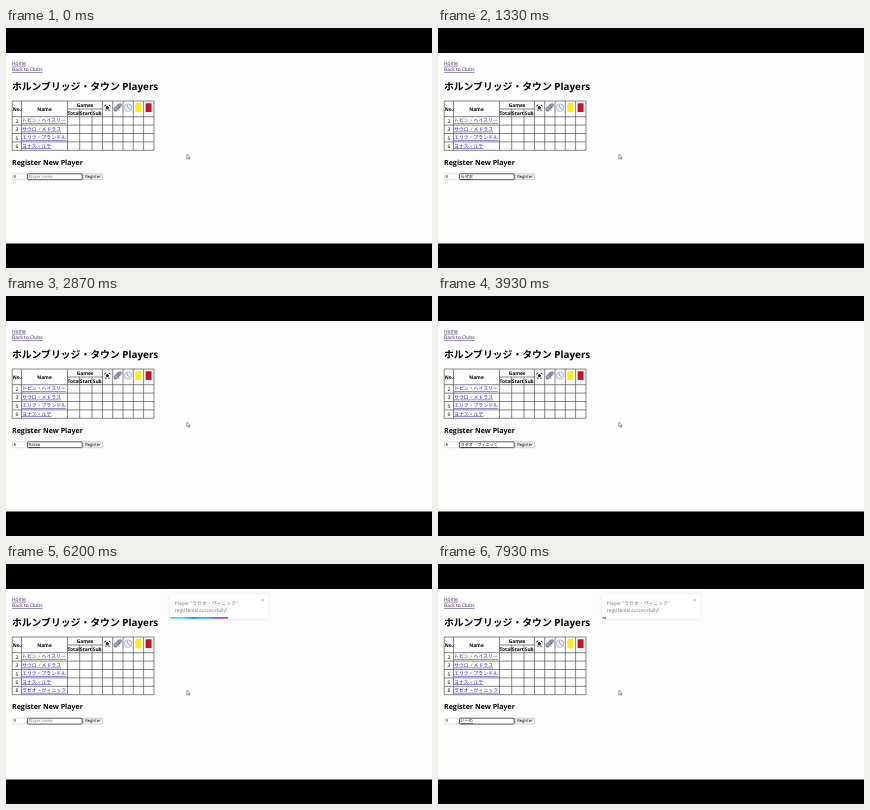
An HTML page for the animation above (8 s loop, 426x240 px).

```html
<!DOCTYPE html>
<html lang="en">
<head>
<meta charset="utf-8">
<title>Players</title>
<style>
  html, body { margin: 0; width: 100%; height: 100%; overflow: hidden; background: #000; }
  svg { display: block; width: 100vw; height: 100vh; }
  text {
    font: 4.9px "Open Sans", "Noto Sans CJK JP", "Noto Sans CJK", sans-serif;
    text-rendering: geometricPrecision;
    white-space: pre;
  }
  .bold text { font-weight: 700; }
  .mid { text-anchor: middle; }
  .link { fill: #2020b4; text-decoration: underline; }
  .visited { fill: #46197c; }
  .h1 { font-size: 9.85px; font-weight: 700; }
  .h2 { font-size: 7.1px; font-weight: 700; }
  .control { font-size: 4.15px; text-decoration-thickness: .25px; }
  .grid { fill: none; stroke: #3a3a3a; stroke-width: .6; }
  .field { fill: #fff; stroke: #aaa; stroke-width: .35; }
  .field.focus { stroke: #111; stroke-width: .7; }
  .toast text { fill: #757575; }
</style>
</head>
<body>
<svg viewBox="0 0 426 240">
  <defs>
    <clipPath id="page"><rect y="25" width="426" height="190.5"/></clipPath>
    <linearGradient id="rainbow">
      <stop offset="0" stop-color="#4cd964"/>
      <stop offset=".2" stop-color="#5ac8fa"/>
      <stop offset=".4" stop-color="#007aff"/>
      <stop offset=".6" stop-color="#34aadc"/>
      <stop offset=".8" stop-color="#5856d6"/>
      <stop offset="1" stop-color="#ff2d55"/>
    </linearGradient>
    <filter id="shadow" x="-10%" y="-30%" width="120%" height="160%">
      <feDropShadow dx="0" dy=".3" stdDeviation="1.5" flood-opacity=".14"/>
    </filter>
  </defs>
  <rect width="426" height="240"/>
  <g clip-path="url(#page)">
    <rect y="25" width="426" height="191" fill="#fdfdfe"/>
    <text class="link visited" x="6" y="36.8">Home</text>
    <text class="link visited" x="6" y="43.3">Back to Clubs</text>
    <text class="h1" x="6" y="61.9">ホルンブリッジ・タウン Players</text>

    <path class="grid" d="M6.2 73H148M61.5 81H96.5M6.2 88.7H148M6.2 73V88.7M15.5 73V88.7M61.5 73V88.7M73.7 81V88.7M86 81V88.7M96.5 73V88.7M106.7 73V88.7M117 73V88.7M127.3 73V88.7M137.6 73V88.7M148 73V88.7"/>
    <g class="bold mid">
      <text x="11" y="82.7">No.</text>
      <text x="38.5" y="82.7">Name</text>
      <text x="79" y="78.8">Games</text>
      <text x="67.6" y="86.7">Total</text>
      <text x="79.9" y="86.7">Start</text>
      <text x="91.2" y="86.7">Sub</text>
    </g>
    <g stroke-width=".6">
      <circle cx="101.4" cy="79.7" r="3.5" fill="#f4f4f8" stroke="#bbc" stroke-width=".4"/>
      <path d="M101.4 78l1.7 1.3-.7 2h-2l-.7-2zM98 78.6l1.2-2 1 1zM104.8 78.6l-1.2-2-1 1zM98.8 82.3l1.8.5-.6-1.6zM104 82.3l-1.8.5.6-1.6z" fill="#223"/>
      <path d="M108 80.5l4.4-4.5 2.6-.2.8 1.8-4.2 4.4-3.2 1z" fill="#9aabc0" stroke="#556"/>
      <path d="M110.5 79l2 1.8M112 77.5l2 1.8M109.4 83.4h1M112.5 82.4h1" fill="none" stroke="#334"/>
      <circle cx="122.1" cy="79.6" r="3.7" fill="#edf2f8" stroke="#8896a8"/>
      <path d="M121 77l1.1 2.7 1.6 1.6" fill="none" stroke="#667"/>
      <rect x="129.4" y="75.2" width="6" height="8.8" rx=".4" fill="#f6f016"/>
      <rect x="139.6" y="75.2" width="6" height="8.8" rx=".4" fill="#d3121f"/>
    </g>
    <g id="rows"></g>

    <g id="form">
      <text class="h2" x="6" y="136.6">Register New Player</text>
      <rect id="numberBox" class="field" x="6.4" y="145.8" width="14.2" height="5.9" rx=".5"/>
      <text id="number" class="control" x="7.4" y="150.1"></text>
      <path id="spinner" d="M16.6 148.3l.9-1.1.9 1.1zM16.6 149.3l.9 1.1.9-1.1z" fill="#444"/>
      <rect id="nameBox" class="field" x="21.6" y="145.8" width="54.6" height="5.9" rx=".5"/>
      <text id="name" class="control" x="22.6" y="150.1"></text>
      <rect x="77.2" y="145.8" width="19.6" height="5.9" rx=".7" fill="#efefef" stroke="#888" stroke-width=".35"/>
      <text class="control mid" x="87" y="150.1">Register</text>
    </g>

    <path d="M180.9 126.2v4.6l1.1-1 .8 1.7.8-.4-.8-1.6h1.5z" fill="#fff" stroke="#333" stroke-width=".45"/>

    <g id="toast" class="toast">
      <rect x="164.2" y="30.3" width="98" height="24.4" rx="1.2" fill="#fff" filter="url(#shadow)"/>
      <text x="168.8" y="40.9">Player "ラゼオ・ヴィニック"</text>
      <text x="168.8" y="47.6">registered successfully!</text>
      <path d="M255.3 34.9l2.4 2.4M257.7 34.9l-2.4 2.4" stroke="#777" stroke-width=".5"/>
      <g transform="translate(164.2 53.1)"><rect id="bar" width="98" height="1.6" fill="url(#rainbow)"/></g>
    </g>
  </g>
</svg>
<script>
const LOOP = 8000, STEP = LOOP / 120;
const ROW_TOP = 88.7, ROW_HEIGHT = 8.4;
const REGISTERED = 4600, NAME_FOCUS = 5500;
const COLUMNS = [6.2, 15.5, 61.5, 73.7, 86, 96.5, 106.7, 117, 127.3, 137.6, 148];
const PLAYERS = [[2, "トビン・ヘイスリー"], [3, "サウロ・メドラス"], [5, "エリク・ブランドル"], [6, "ヨナス・ルテ"], [8, "ラゼオ・ヴィニック"]];

// [start time, field content, still being composed]
const TYPING = [
  [0, ""], [400, "r", 1], [530, "ら", 1], [730, "らz", 1], [870, "らぜ", 1], [1130, "らぜお", 1],
  [2000, "ラゼオ", 1], [2600, "Razeo", 1], [3000, "ラゼオ", 1], [3130, "ラゼオ・", 1],
  [3330, "ラゼオ・ヴ", 1], [3470, "ラゼオ・ヴィ", 1], [3670, "ラゼオ・ヴィニ", 1],
  [3800, "ラゼオ・ヴィニッ", 1], [3900, "ラゼオ・ヴィニッく", 1], [4130, "ラゼオ・ヴィニック", 1],
  [4400, "ラゼオ・ヴィニック"], [REGISTERED, ""],
  [7130, "い", 1], [7470, "いー", 1], [7730, "いーの", 1]
];

// Toast drop: [time, vertical offset]
const BOUNCE = [[4648, -918], [4912, 7.6], [4978, -3], [5044, 1.5], [5088, 0]];
const BAR_START = 4905, BAR_LENGTH = 3150;

const ui = id => document.getElementById(id);
const easeOut = p => 1 - (1 - p) ** 2.4;

ui("rows").innerHTML = PLAYERS.map(([no, player], i) => {
  const top = ROW_TOP + i * ROW_HEIGHT, bottom = top + ROW_HEIGHT;
  const lines = COLUMNS.map(x => `M${x} ${top}V${bottom}`).join("");
  return `<g><path class="grid" d="${lines}M6.2 ${bottom}H148"/>
    <text class="mid" x="11" y="${top + 6}">${no}</text>
    <text class="link" x="16" y="${top + 5.6}">${player}</text></g>`;
}).join("");
const newRow = ui("rows").lastElementChild;

function show(node, visible) {
  node.style.display = visible ? "" : "none";
}

function toastOffset(t) {
  const next = BOUNCE.findIndex(([time]) => time > t);
  if (next < 0) return 0;
  if (next === 0) return BOUNCE[0][1];
  const [t0, y0] = BOUNCE[next - 1], [t1, y1] = BOUNCE[next];
  return y0 + (y1 - y0) * easeOut((t - t0) / (t1 - t0));
}

function render(t) {
  const registered = t >= REGISTERED;
  const numberFocused = registered && t < NAME_FOCUS;
  const [, value, composing] = TYPING.findLast(([start]) => start <= t);

  show(newRow, registered);
  ui("form").setAttribute("transform", `translate(0 ${registered ? ROW_HEIGHT : 0})`);
  ui("number").textContent = t < 4860 ? "8" : "9";
  ui("numberBox").classList.toggle("focus", numberFocused);
  ui("nameBox").classList.toggle("focus", !numberFocused);
  show(ui("spinner"), numberFocused);

  const name = ui("name");
  name.textContent = value || "Player name";
  name.style.fill = value ? "#000" : "#757575";
  name.style.textDecorationLine = composing ? "underline" : "none";

  const left = Math.min(1, Math.max(0, 1 - (t - BAR_START) / BAR_LENGTH));
  show(ui("toast"), t >= BOUNCE[0][0]);
  ui("toast").setAttribute("transform", `translate(0 ${toastOffset(t)})`);
  ui("bar").setAttribute("transform", `scale(${left} 1)`);
}

const origin = performance.now();
function tick() {
  const t = (performance.now() - origin) % LOOP;
  render(Math.floor((t + 4) / STEP) % 120 * STEP);
  requestAnimationFrame(tick);
}
tick();
</script>
</body>
</html>
```
